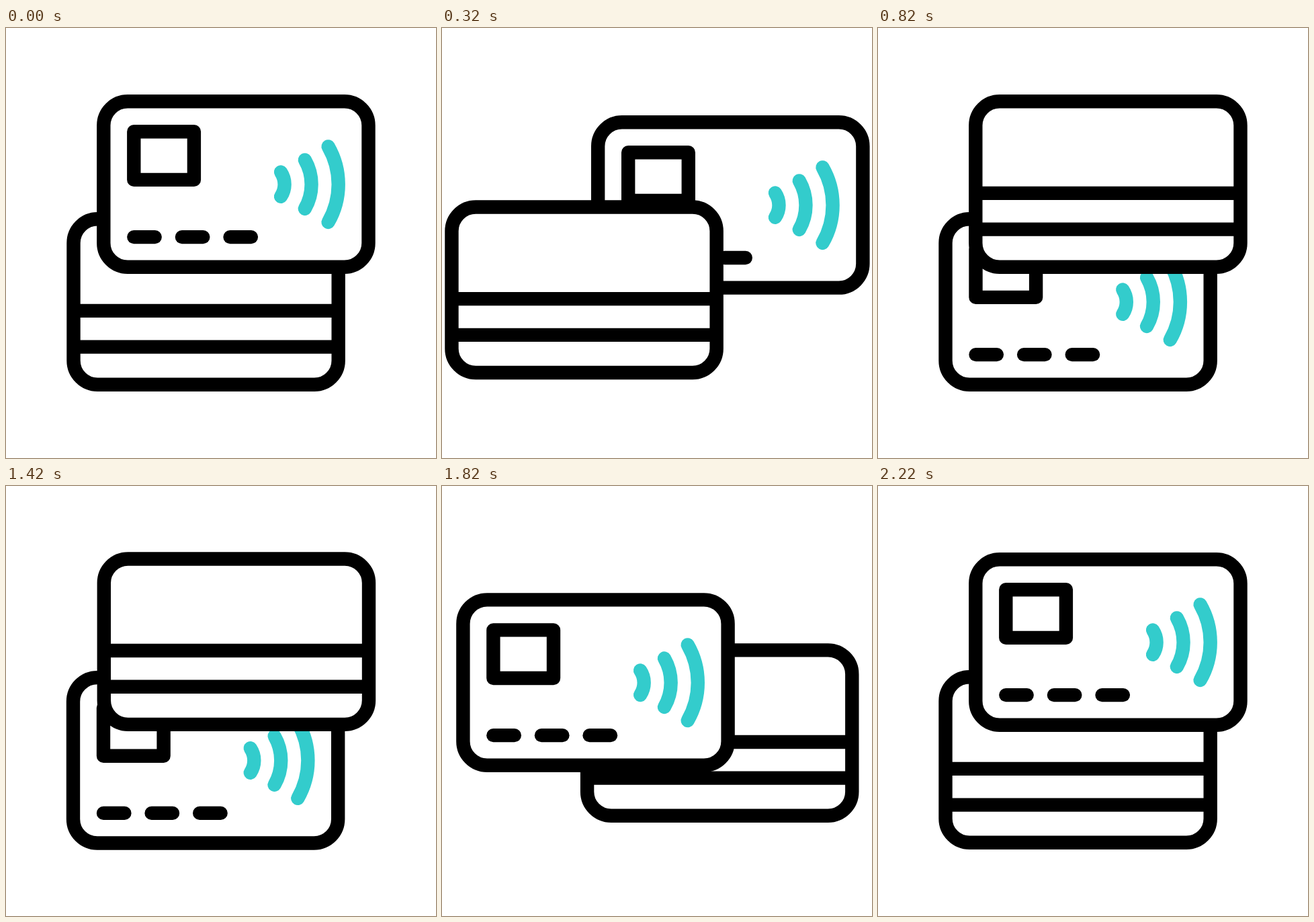
Animation of 640x640 px, one loop 2600 ms. Source, as an HTML page with a canvas:

```html
<!DOCTYPE html>
<html lang="en">
<head>
<meta charset="utf-8">
<title>Swapping cards</title>
<style>
  html, body { margin: 0; width: 100%; height: 100%; overflow: hidden; background: #fff; }
  canvas { display: block; width: 640px; height: 640px; }
</style>
</head>
<body>
<canvas id="stage" width="640" height="640"></canvas>
<script>
const ctx = document.getElementById('stage').getContext('2d');
const LOOP = 2600, SECOND = 1400, MOVE = 820, SWAP = 200, STEP = 20;
const W = 414.6, H = 266.8, LINE = 20.4, HALF = LINE / 2;
const INK = '#000', TEAL = '#33cccc';
const TOP = [135.1, 99.1], LOW = [90.3, 274.1];

const cubic = (a, b, c, d, s) => {
  const r = 1 - s;
  return r * r * r * a + 3 * r * r * s * b + 3 * r * s * s * c + s * s * s * d;
};

// Bezier path sampled by distance, so that easing acts on arc length.
function makePath(from, out, into, to) {
  const N = 500, pts = [], dist = [0];
  for (let i = 0; i <= N; i++) {
    pts.push([0, 1].map(k =>
      cubic(from[k], from[k] + out[k], to[k] + into[k], to[k], i / N)));
    if (i) {
      dist.push(dist[i - 1] +
        Math.hypot(pts[i][0] - pts[i - 1][0], pts[i][1] - pts[i - 1][1]));
    }
  }
  return part => {
    const goal = part * dist[N];
    let i = 1;
    while (i < N && dist[i] < goal) i++;
    const f = (goal - dist[i - 1]) / (dist[i] - dist[i - 1]);
    return [0, 1].map(k => pts[i - 1][k] + (pts[i][k] - pts[i - 1][k]) * f);
  };
}

const sink = makePath(TOP, [175.5, -298], [94.3, 322], LOW);
const rise = makePath(LOW, [-178.2, 286.8], [-87, -267.9], TOP);

function ease(x) {
  if (x <= 0) return 0;
  if (x >= 1) return 1;
  let lo = 0, hi = 1;
  for (let i = 0; i < 30; i++) {
    const mid = (lo + hi) / 2;
    if (cubic(0, 0.328, 0.594, 1, mid) < x) lo = mid; else hi = mid;
  }
  return cubic(0, 0, 1, 1, lo);
}

function line(x1, y1, x2, y2) {
  ctx.beginPath();
  ctx.moveTo(x1, y1);
  ctx.lineTo(x2, y2);
  ctx.stroke();
}

// The fill reaches only to the middle of the outline, so no pale rim shows.
function body() {
  ctx.beginPath();
  ctx.roundRect(HALF, HALF, W - LINE, H - LINE, 46 - HALF);
  ctx.fillStyle = '#fff';
  ctx.fill();
  ctx.strokeStyle = INK;
  ctx.lineWidth = LINE;
  ctx.stroke();
}

function front() {
  ctx.lineCap = ctx.lineJoin = 'round';
  ctx.strokeRect(45 + HALF, 45 + HALF, 110 - LINE, 92 - LINE);
  for (let i = 0; i < 3; i++) {
    const x = 45 + HALF + i * 71.6;
    line(x, 212, x + 31.4, 212);
  }
  ctx.strokeStyle = TEAL;
  for (const [r, deg] of [[32.5, 34], [72.5, 30], [112.6, 30]]) {
    const a = deg * Math.PI / 180;
    ctx.beginPath();
    ctx.arc(247, 133.6, r, -a, a);
    ctx.stroke();
  }
}

function back() {
  ctx.lineCap = 'butt';
  for (const y of [146.8, 200.5]) line(HALF, y, W - HALF, y);
}

function card(face, [x, y]) {
  ctx.save();
  ctx.translate(x, y);
  body();
  face();
  ctx.restore();
}

function draw(time) {
  const t = Math.floor((time % LOOP) / STEP) * STEP;
  const late = t >= SECOND;
  const local = late ? t - SECOND : t;
  const part = ease(local / MOVE);
  const cards = [
    [late ? front : back, rise(part)],
    [late ? back : front, sink(part)]
  ];
  if (local >= SWAP) cards.reverse();
  ctx.fillStyle = '#fff';
  ctx.fillRect(0, 0, 640, 640);
  for (const [face, pos] of cards) card(face, pos);
}

const start = performance.now();
function tick() {
  draw(performance.now() - start);
  requestAnimationFrame(tick);
}
tick();
</script>
</body>
</html>
```
